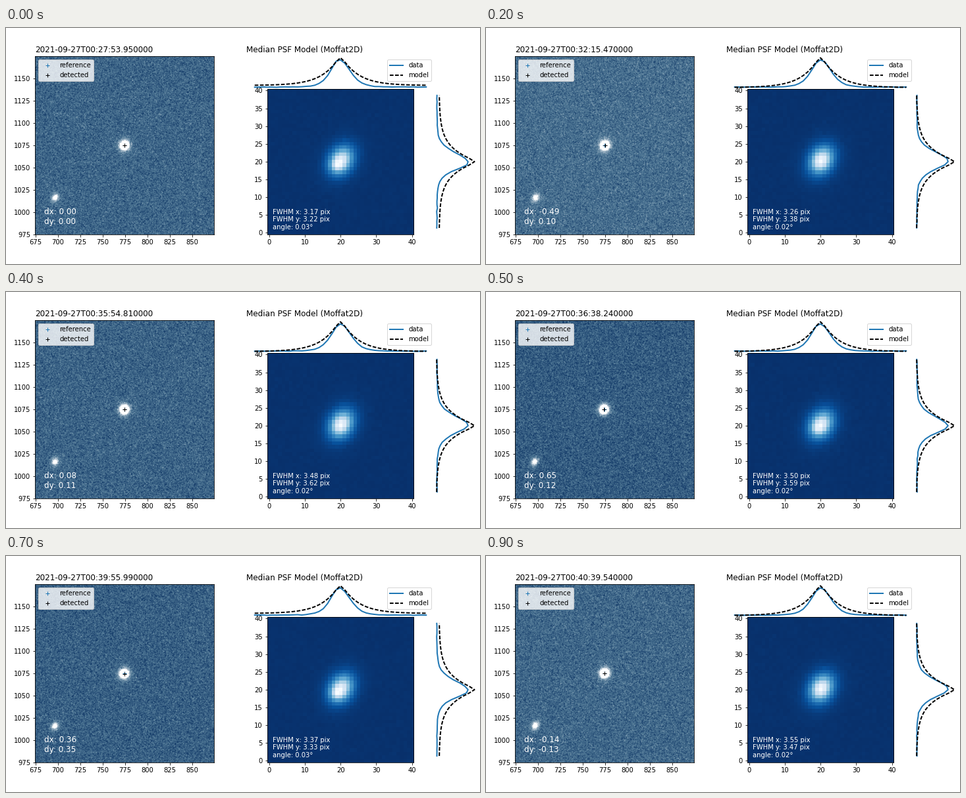
These frames come from a looping animation (720x360 px, 1000 ms). A matplotlib script:

```python
import numpy as np
import matplotlib.pyplot as plt
from matplotlib.animation import FuncAnimation
from matplotlib.colors import LinearSegmentedColormap

W, H, DPI = 720, 360, 72
FRAMES, INTERVAL = 10, 100
REF = np.array([774.7, 1074.7])
SECOND = (-77.4, -58.7)
DASHES = (0, (2.8, 1.2))

# Printed readings: step, seconds after midnight, dx, dy, FWHM x, FWHM y
READINGS = np.array([
    (0, 1673.95, 0.00, 0.00, 3.17, 3.22),
    (2, 1935.47, -0.49, 0.10, 3.26, 3.38),
    (4, 2154.81, 0.08, 0.11, 3.48, 3.62),
    (6, 2241.67, 1.23, 0.14, 3.51, 3.57),
    (7, 2395.99, 0.36, 0.35, 3.37, 3.33),
    (8, 2417.52, 1.27, 0.43, 3.47, 3.42),
    (9, 2439.54, -0.14, -0.13, 3.55, 3.47),
])


def readings_at(step):
    steps, *columns = READINGS.T
    return [np.interp(step, steps, column) for column in columns]


def moffat(x, y, major, minor, tilt=60, beta=3):
    """Elliptical Moffat profile from its half widths at half maximum."""
    c, s = np.cos(np.radians(tilt)), np.sin(np.radians(tilt))
    u, v = (x * c + y * s) / major, (y * c - x * s) / minor
    return (1 + (u**2 + v**2) * (2 ** (1 / beta) - 1)) ** -beta


def unit(values):
    return (values - values.min()) / (values.max() - values.min())


def sky_image(dx, dy, rng):
    """Noisy field with two stars; the sky darkens as the drift grows."""
    y, x = np.mgrid[-99.5:100, -99.5:100]
    img = 0.21 * np.exp(-0.4 * dx) + rng.normal(0, 0.1, x.shape)
    x, y = x + dx, y + dy
    img += 4 * moffat(x, y, 3.2, 3)
    img += 1.2 * moffat(x - SECOND[0], y - SECOND[1], 3.2, 2.5)
    return img


def psf_image(skew, rng):
    """Round body with a sharp core that is pulled off centre by the skew."""
    y, x = np.mgrid[:41, :41]
    core = 19.7 - 0.7 * skew
    img = moffat(x - 20.2, y - 20.4, 3.1, 2.4, beta=4)
    img += (0.15 + 0.3 * skew) * moffat(x - core, y - core, 1.5, 1.4)
    return img / img.max() + rng.normal(0.008, 0.004, x.shape)


def axes_at(left, top, right, bottom):
    return fig.add_axes([left / W, 1 - bottom / H,
                         (right - left) / W, (bottom - top) / H])


plt.rcParams["font.family"] = "DejaVu Sans"
plt.rcParams["lines.linewidth"] = 2
fig = plt.figure(figsize=(W / DPI, H / DPI), dpi=DPI, facecolor="white")
slate = LinearSegmentedColormap.from_list(
    "slate", [(0, "#173e6b"), (0.3, "#4e7694"), (1, "white")])

# Field of view
field = axes_at(44.2, 43.2, 316.2, 315.2)
x0, y0 = REF - 100
x1, y1 = REF + 100
sky = field.imshow(np.zeros((200, 200)), cmap=slate, vmin=0, vmax=1,
                   origin="lower", extent=(x0, x1, y0, y1), aspect="auto")
field.plot(*REF[:, None], "+", color="C0", label="reference")
detected, = field.plot([], [], "+", color="k", label="detected")
field.set(xlim=(x0, x1), ylim=(y0, y1),
          xticks=range(675, 875, 25), yticks=range(975, 1175, 25))
field.legend(loc="upper left", fontsize=10)
stamp = field.set_title("", loc="left", fontsize=12)
shift = field.text(0.05, 0.05, "", transform=field.transAxes,
                   color="white", fontsize=12, va="bottom")

# PSF and its marginal profiles
psf_ax = axes_at(397, 92.7, 619.4, 315.1)
psf = psf_ax.imshow(np.zeros((41, 41)), cmap="Blues_r", vmin=0, vmax=1,
                    origin="lower", aspect="auto")
psf_ax.set(xticks=range(0, 41, 10), yticks=range(0, 41, 5))
info = psf_ax.text(1, 1, "", color="white", fontsize=10)

top = axes_at(364.7, 43.2, 651.3, 92.7)
side = axes_at(651.3, 92.7, 714.5, 315.1)
for ax in (top, side):
    ax.axis("off")
top.set(xlim=(-2, 42), ylim=(-0.05, 1.05))
side.set(xlim=(-0.05, 1.05), ylim=(-2, 42))
(top_data, top_model), (side_data, side_model) = [
    (ax.plot([], [], color="C0", label="data")[0],
     ax.plot([], [], color="k", ls=DASHES, label="model")[0])
    for ax in (top, side)]
top.legend(loc="upper right", fontsize=10)
top.set_title("Median PSF Model (Moffat2D)", loc="left", fontsize=12)

pix = np.arange(41)
model = unit(np.exp(-np.hypot(pix - 20, 0.5) / 3.9))


def update(step):
    rng = np.random.default_rng(100 + step)
    time, dx, dy, fwhm_x, fwhm_y = readings_at(step)
    broad = step % 7 == 0  # the fit keeps wide wings every seventh exposure
    skew = 1 if broad else np.clip(dx, 0, 1)

    sky.set_data(sky_image(dx, dy, rng))
    image = psf_image(skew, rng)
    psf.set_data(image)

    detected.set_data([REF[0] - dx], [REF[1] - dy])
    minutes, seconds = divmod(time, 60)
    stamp.set_text(f"2021-09-27T00:{int(minutes):02d}:{seconds:05.2f}0000")
    shift.set_text(f"dx: {dx:.2f}\ndy: {dy:.2f}")
    info.set_text(f"FWHM x: {fwhm_x:.2f} pix\nFWHM y: {fwhm_y:.2f} pix\n"
                  f"angle: {0.03 if broad else 0.02:.2f}°")

    base = 0.07 if broad else 0
    fit = base + (1 - base) * model
    top_data.set_data(pix, 0.93 * unit(image.sum(axis=0)))
    top_model.set_data(pix, fit)
    side_data.set_data(0.83 * unit(image.sum(axis=1)), pix)
    side_model.set_data(fit, pix)
    return (sky, psf, detected, stamp, shift, info,
            top_data, top_model, side_data, side_model)


anim = FuncAnimation(fig, update, frames=FRAMES, interval=INTERVAL,
                     repeat=True, repeat_delay=0, blit=False)
plt.show()
```
